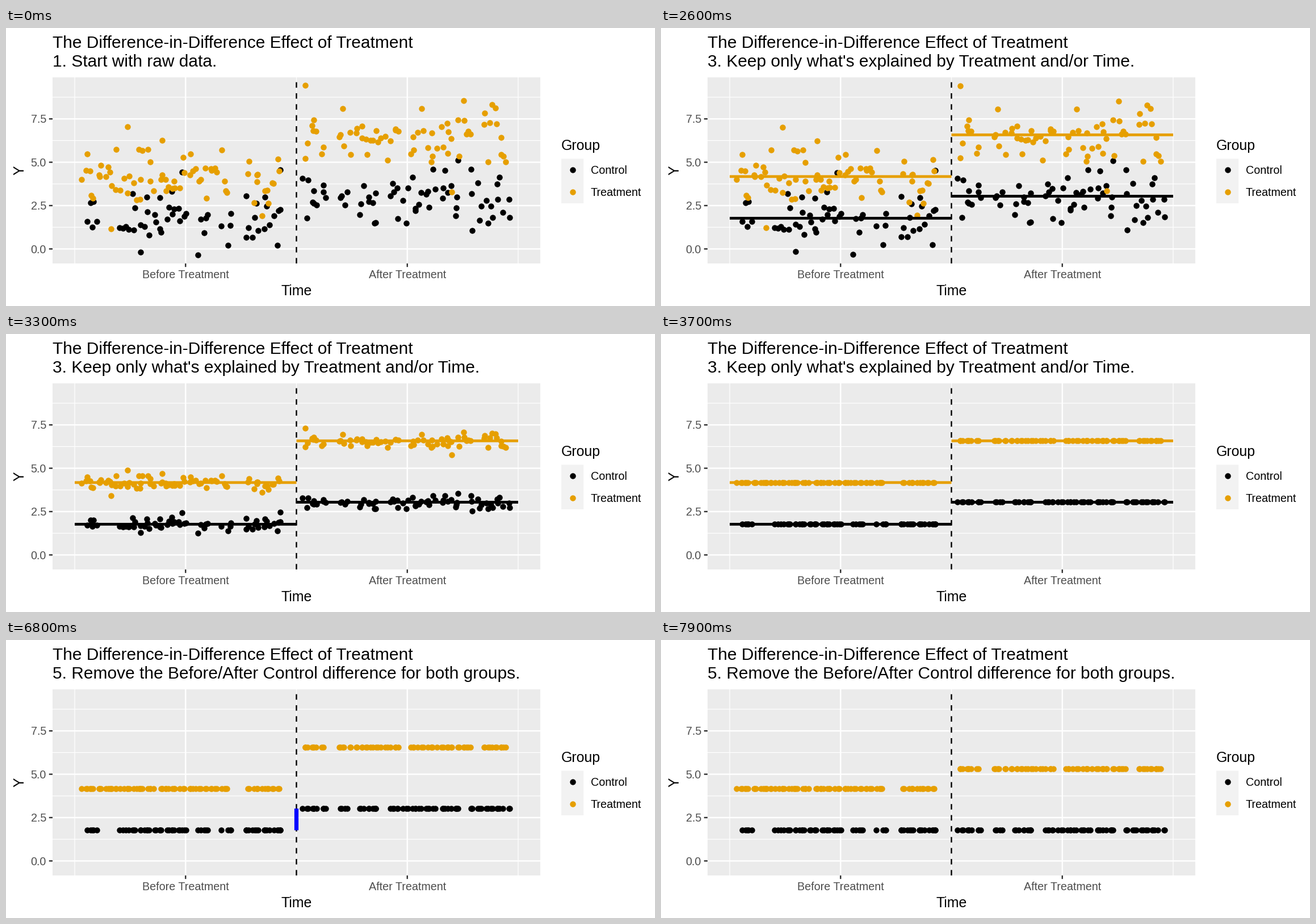
A matplotlib script for the animation above (8000 ms loop, 1143 px wide and 490 px high).

```python
import math

import matplotlib.pyplot as plt
import numpy as np
from matplotlib.animation import FuncAnimation

W, H, DPI = 1143, 490, 100
PX = 72 / DPI
FRAMES, INTERVAL = 80, 100
LEFT, RIGHT, TOP, BOTTOM = 82, 941, 87, 415
MID, HALF = 511.5, 390.5
BLACK, ORANGE, GREY = "#000000", "#E69F00", "#4D4D4D"
THIN, THICK, DOT = 1.21, 2.42, 10.45
TITLE, HEADING, SMALL = 29.94, 24.95, 19.8
COUNT, SPREAD, GAP = 75, 25, 9
MOVE = 12  # frames per eased transition

STEPS = [
    (0, "1. Start with raw data."),
    (5, "2. Figure out what differences in Y are explained by Treatment and/or Time."),
    (26, "3. Keep only what's explained by Treatment and/or Time."),
    (47, "4. See how Control changed over Time."),
    (68, "5. Remove the Before/After Control difference for both groups."),
]
COLLAPSE, LINES_ON, LINES_OFF, BAR_ON, REMOVE = 26, 9, 47, 51, 68

plt.rcParams.update({
    "font.family": "Liberation Sans",
    "path.snap": False,
    "lines.solid_capstyle": "butt",
})
fig = plt.figure(figsize=(W / DPI, H / DPI), dpi=DPI, facecolor="white")
ax = fig.add_axes([0, 0, 1, 1])
ax.set(xlim=(0, W), ylim=(H, 0))
ax.axis("off")
rng = np.random.default_rng(12)


def y_pos(value):
    return 389.4 - 30.56 * value


def box(x0, y0, x1, y1, color):
    ax.add_patch(plt.Rectangle((x0, y0), x1 - x0, y1 - y0, fc=color, lw=0, zorder=0))


def segment(xs, ys, width, color, z=1, style="-"):
    return ax.plot(xs, ys, color=color, lw=width * PX, ls=style, zorder=z)[0]


def label(x, y, text, size, color=BLACK, **kw):
    return ax.text(x, y, text, fontsize=size * PX, color=color, va="baseline", **kw)


def dots(x, y, color):
    return ax.scatter(x, y, s=(DOT * PX) ** 2, c=color, linewidths=0, zorder=2)


def ease(frame, start):
    t = min(max(frame - start + 1, 0), MOVE) / MOVE
    return (1 - math.cos(math.pi * t)) / 2


class Row:
    """One group in one period: random points around a mean line."""

    def __init__(self, color, after, value, span, gaps, extremes):
        self.mean, self.after = y_pos(value), after
        x = np.linspace(*span, COUNT) + rng.uniform(-5, 5, COUNT)
        x = np.clip(x, *span)
        x = x[[all(abs(v - g) > GAP for g in gaps) for v in x]]
        noise = np.clip(rng.normal(0, 1, len(x)), -1.9, 1.9)
        far_x, far_y = zip(*extremes)
        self.x = np.append(x, far_x)
        self.y = np.append(self.mean + SPREAD * noise, far_y)
        self.points = dots(self.x, self.y, color)
        start = MID if after else MID - HALF
        self.line = segment([start, start + HALF], [self.mean] * 2, 4.84, color, 4)

    def update(self, frame):
        y = self.y + (self.mean - self.y) * ease(frame, COLLAPSE)
        if self.after:
            y = y + CHANGE * ease(frame, REMOVE)
        self.points.set_offsets(np.column_stack([self.x, y]))
        self.line.set_visible(LINES_ON <= frame < LINES_OFF)


# Panel, grid and axes
box(LEFT, TOP, RIGHT, BOTTOM, "#EBEBEB")
for v in np.arange(1.25, 9, 2.5):
    segment([LEFT, RIGHT], [y_pos(v)] * 2, THIN, "white")
for x in (MID - HALF, MID, MID + HALF):
    segment([x, x], [TOP, BOTTOM], THIN, "white")
for v in np.arange(0, 8, 2.5):
    y = y_pos(v)
    segment([LEFT, RIGHT], [y, y], THICK, "white")
    segment([LEFT - 6.2, LEFT], [y, y], THICK, "#333333")
    label(71, y + 7.2, f"{v:.1f}", SMALL, GREY, ha="right")
for side, name in ((-1, "Before Treatment"), (1, "After Treatment")):
    x = MID + side * HALF / 2
    segment([x, x], [TOP, BOTTOM], THICK, "white")
    segment([x, x], [BOTTOM, BOTTOM + 6.2], THICK, "#333333")
    label(x, 441, name, SMALL, GREY, ha="center")
segment([MID, MID], [BOTTOM, TOP], THICK, BLACK, 3, (0, (4, 4)))
label(MID, 471, "Time", HEADING, ha="center")
label(31, (TOP + BOTTOM) / 2, "Y", HEADING, ha="center",
      rotation=90, rotation_mode="anchor")

# Legend
label(978, 215, "Group", HEADING)
box(978, 230.5, 1017.2, 309, "#F2F2F2")
for y, color, name in ((250, BLACK, "Control"), (289.2, ORANGE, "Treatment")):
    dots([997.7], [y], color)
    label(1029.7, y + 7.2, name, SMALL)

label(82, 35.3, "The Difference-in-Difference Effect of Treatment", TITLE)
step_text = label(82, 67.6, "", TITLE)

rows = [
    Row(BLACK, False, 1.77, (143, 483), (169, 186, 329, 368, 410),
        [(237, 395), (310, 254), (338, 400), (483, 250)]),
    Row(BLACK, True, 3.04, (522, 887), (577, 612, 661, 806),
        [(649, 344), (796, 233), (821, 357)]),
    Row(ORANGE, False, 4.175, (131, 481), (399, 414),
        [(185, 354), (214, 174), (275, 198), (451, 331)]),
    Row(ORANGE, True, 6.58, (527, 885), (573, 700, 831),
        [(527, 101), (785, 289), (806, 128), (856, 135)]),
]
BASE, RAISED = rows[0].mean, rows[1].mean
CHANGE = BASE - RAISED
bar = segment([MID, MID], [BASE, RAISED], 7.26, "#0000FF", 5)


def update(frame):
    step_text.set_text([text for start, text in STEPS if start <= frame][-1])
    for row in rows:
        row.update(frame)
    removed = ease(frame, REMOVE)
    bar.set_ydata([BASE, RAISED + CHANGE * removed])
    bar.set_visible(frame >= BAR_ON and removed < 1)


anim = FuncAnimation(fig, update, frames=FRAMES, init_func=lambda: update(0),
                     interval=INTERVAL, repeat=True, repeat_delay=0)
plt.show()
```
